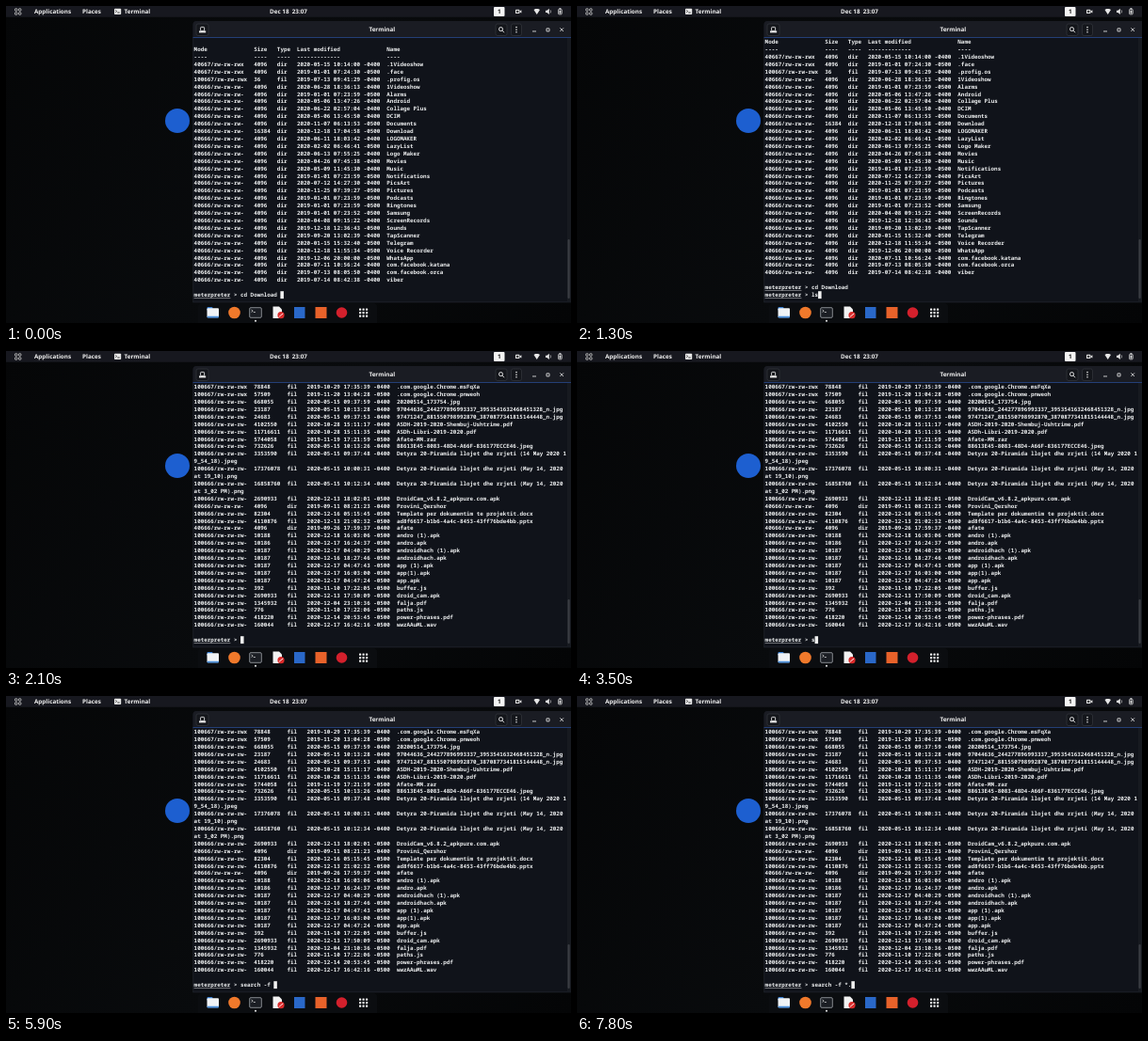
An HTML page with a canvas for the animation above (8 s loop, 600 px wide and 337 px high).

```html
<!DOCTYPE html>
<html lang="en">
<head>
<meta charset="utf-8">
<title>Terminal session</title>
<style>
html, body { margin: 0; width: 100%; height: 100%; overflow: hidden; background: #050608; }
canvas { display: block; width: 600px; height: 337px; }
</style>
</head>
<body>
<canvas id="stage" width="600" height="337"></canvas>
<script>
const ctx = document.getElementById('stage').getContext('2d');
const LOOP = 8000;
const ROWS = 35, COLS = 112, CELL = 3.53, LINE = 7.91, LEFT = 199.6, LAST_ROW = 307;
const PROMPT = 'meterpreter > ';
const MONO = '600 5.88px "Noto Sans Mono", "DejaVu Sans Mono", monospace';
const SANS = '700 6.3px "Open Sans", "Noto Sans", sans-serif';

const HOME = `4096 dir 2020-05-15 10:14:00 -0400 .1Videoshow
4096 dir 2019-01-01 07:24:30 -0500 .face
36 fil 2019-07-13 09:41:29 -0400 .profig.os
4096 dir 2020-06-28 18:36:13 -0400 1Videoshow
4096 dir 2019-01-01 07:23:59 -0500 Alarms
4096 dir 2020-05-06 13:47:26 -0400 Android
4096 dir 2020-06-22 02:57:04 -0400 Collage Plus
4096 dir 2020-05-06 13:45:50 -0400 DCIM
4096 dir 2020-11-07 06:13:53 -0500 Documents
16384 dir 2020-12-18 17:04:58 -0500 Download
4096 dir 2020-06-11 18:03:42 -0400 LOGOMAKER
4096 dir 2020-02-02 06:46:41 -0500 LazyList
4096 dir 2020-06-13 07:55:25 -0400 Logo Maker
4096 dir 2020-04-26 07:45:38 -0400 Movies
4096 dir 2020-05-09 11:45:30 -0400 Music
4096 dir 2019-01-01 07:23:59 -0500 Notifications
4096 dir 2020-07-12 14:27:30 -0400 PicsArt
4096 dir 2020-11-25 07:39:27 -0500 Pictures
4096 dir 2019-01-01 07:23:59 -0500 Podcasts
4096 dir 2019-01-01 07:23:59 -0500 Ringtones
4096 dir 2019-01-01 07:23:52 -0500 Samsung
4096 dir 2020-04-08 09:15:22 -0400 ScreenRecords
4096 dir 2019-12-18 12:36:43 -0500 Sounds
4096 dir 2019-09-20 13:02:39 -0400 TapScanner
4096 dir 2020-01-15 15:32:40 -0500 Telegram
4096 dir 2020-12-18 11:55:34 -0500 Voice Recorder
4096 dir 2019-12-06 20:00:00 -0500 WhatsApp
4096 dir 2020-07-11 10:56:24 -0400 com.facebook.katana
4096 dir 2019-07-13 08:05:50 -0400 com.facebook.orca
4096 dir 2019-07-14 08:42:38 -0400 viber`;

const DOWNLOAD = `78848 fil 2019-10-29 17:35:39 -0400 .com.google.Chrome.msFqXa
57509 fil 2019-11-20 13:04:28 -0500 .com.google.Chrome.pnweoh
668055 fil 2020-05-15 09:37:59 -0400 20200514_173754.jpg
23187 fil 2020-05-15 10:13:28 -0400 97044636_244277896993337_3953541632468451328_n.jpg
24683 fil 2020-05-15 09:37:53 -0400 97471247_881550798992870_3870877341815144448_n.jpg
4102550 fil 2020-10-28 15:11:17 -0400 ASDH-2019-2020-Shembuj-Ushtrime.pdf
11716611 fil 2020-10-28 15:11:35 -0400 ASDh-Libri-2019-2020.pdf
5744058 fil 2019-11-19 17:21:59 -0500 Afate-MM.rar
732626 fil 2020-05-15 10:13:26 -0400 B8613E45-8083-48D4-A66F-836177ECCE46.jpeg
3353590 fil 2020-05-15 09:37:48 -0400 Detyra 20-Piramida llojet dhe rrjeti (14 May 2020 19_54_18).jpeg
17376078 fil 2020-05-15 10:00:31 -0400 Detyra 20-Piramida llojet dhe rrjeti (May 14, 2020 at 19_10).png
16858760 fil 2020-05-15 10:12:34 -0400 Detyra 20-Piramida llojet dhe rrjeti (May 14, 2020 at 3_02 PM).png
2690933 fil 2020-12-13 18:02:01 -0500 DroidCam_v6.8.2_apkpure.com.apk
4096 dir 2019-09-11 08:21:23 -0400 Provini_Qershor
82304 fil 2020-12-16 05:15:45 -0500 Template per dokumentim te projektit.docx
4110876 fil 2020-12-13 21:02:32 -0500 ad8f6617-b1b6-4a4c-8453-43ff76bde4bb.pptx
4096 dir 2019-09-26 17:59:37 -0400 afate
10188 fil 2020-12-18 16:03:06 -0500 andro (1).apk
10186 fil 2020-12-17 16:24:37 -0500 andro.apk
10187 fil 2020-12-17 04:40:29 -0500 androidhach (1).apk
10187 fil 2020-12-16 18:27:46 -0500 androidhach.apk
10187 fil 2020-12-17 04:47:43 -0500 app (1).apk
10187 fil 2020-12-17 16:03:00 -0500 app(1).apk
10187 fil 2020-12-17 04:47:24 -0500 app.apk
392 fil 2020-11-10 17:22:05 -0500 buffer.js
2690933 fil 2020-12-13 17:50:09 -0500 droid_cam.apk
1345932 fil 2020-12-04 23:10:36 -0500 falja.pdf
776 fil 2020-11-10 17:22:06 -0500 paths.js
418220 fil 2020-12-14 20:53:45 -0500 power-phrases.pdf
160044 fil 2020-12-17 16:42:16 -0500 wwzAAuML.wav`;

const row = (sizeWidth, mode, size, type, date, name) =>
  mode.padEnd(18) + size.padEnd(sizeWidth + 2) + type.padEnd(6) + date.padEnd(27) + name;

// Formats a listing and wraps it at the terminal width.
function table(text, sizeWidth) {
  return text.split('\n').flatMap(entry => {
    const [, size, type, date, name] = entry.match(/^(\d+) (\w+) (.{25}) (.+)$/);
    const open = name.startsWith('.');
    const mode = (type === 'dir' ? '40' : '100') + (open ? '667/rw-rw-rwx' : '666/rw-rw-rw-');
    const line = row(sizeWidth, mode, size, type, date, name);
    return line.length > COLS ? [line.slice(0, COLS), line.slice(COLS)] : [line];
  });
}

const homeLines = [
  row(5, 'Mode', 'Size', 'Type', 'Last modified', 'Name'),
  row(5, '----', '----', '----', '-------------', '----'),
  ...table(HOME, 5), ''
];
const downloadLines = [...table(DOWNLOAD, 8), ''];

const typed = (text, times, t) => text.slice(0, times.filter(at => t >= at).length);
const LS_KEYS = [1100, 1300];
const SEARCH_KEYS = [3500, 3700, 4100, 4200, 4500, 4800, 5000, 5500, 5700, 5900, 7300, 7800];
const BLINKS = [[800, 1100], [2900, 3500], [6500, 7100]];

function linesAt(t) {
  if (t >= 2100) return [...downloadLines, PROMPT + typed('search -f *.', SEARCH_KEYS, t)];
  if (t < 300) return [...homeLines, PROMPT + 'cd Download '];
  const lines = [...homeLines, PROMPT + 'cd Download'];
  if (t < 400) return [...lines, ''];
  lines.push(PROMPT + typed('ls', LS_KEYS, t));
  return t < 1700 ? lines : [...lines, ''];
}

function rect(x, y, w, h, color, radius = 0) {
  ctx.fillStyle = color;
  ctx.beginPath();
  ctx.roundRect(x, y, w, h, radius);
  ctx.fill();
}
function frame(x, y, w, h, color, radius = 0, weight = 0.8) {
  ctx.strokeStyle = color;
  ctx.lineWidth = weight;
  ctx.beginPath();
  ctx.roundRect(x, y, w, h, radius);
  ctx.stroke();
}
function disc(x, y, r, color) {
  ctx.fillStyle = color;
  ctx.beginPath();
  ctx.arc(x, y, r, 0, Math.PI * 2);
  ctx.fill();
}
function path(points, color, weight) {
  ctx.beginPath();
  points.forEach(([x, y]) => ctx.lineTo(x, y));
  if (weight) {
    ctx.strokeStyle = color;
    ctx.lineWidth = weight;
    ctx.stroke();
  } else {
    ctx.fillStyle = color;
    ctx.fill();
  }
}
function label(text, x, y, align = 'left', color = '#f0f0f0') {
  ctx.font = SANS;
  ctx.textAlign = align;
  ctx.fillStyle = color;
  ctx.fillText(text, x, y);
}
function dots(x, y, step, size, color) {
  for (let i = 0; i < 9; i++) rect(x + i % 3 * step, y + Math.floor(i / 3) * step, size, size, color, 0.4);
}

function drawDesktop() {
  const shade = ctx.createLinearGradient(0, 0, 600, 337);
  shade.addColorStop(0, '#050607');
  shade.addColorStop(0.5, '#090b0d');
  shade.addColorStop(1, '#040506');
  ctx.fillStyle = shade;
  ctx.fillRect(0, 0, 600, 337);
  disc(182, 122, 13, '#1d5fd0');
}

function drawTopBar() {
  rect(0, 0, 600, 11.8, '#17181f');
  for (let i = 0; i < 4; i++) frame(9.5 + i % 2 * 4, 2.8 + (i >> 1) * 4, 2.4, 2.4, '#d8d8d8', 0.6, 0.8);
  label('Applications', 30, 8.3);
  label('Places', 81, 8.3);
  rect(115, 2.8, 7.2, 6.2, '#e8e8e8', 0.8);
  path([[116.2, 4.4], [117.6, 5.6], [116.2, 6.8]], '#111', 0.7);
  rect(118.3, 6.6, 2.4, 0.8, '#111');
  label('Terminal', 125.5, 8.3);
  label('Dec 18  23:07', 300, 8.3, 'center');
  rect(518, 1, 11.5, 10, '#f4f4f4', 1);
  label('1', 523.7, 8.3, 'center', '#111');
  rect(541, 3.8, 4.4, 4.2, '#e0e0e0', 0.6);
  rect(542.1, 4.9, 2.2, 2, '#17181f');
  path([[545.4, 5.4], [547.4, 4.2], [547.4, 7.6], [545.4, 6.4]], '#e0e0e0');
  path([[560.5, 4], [562.2, 3], [565.2, 3], [567, 4], [563.7, 9]], '#e8e8e8');
  path([[573, 4.8], [574.5, 4.8], [576.8, 2.8], [576.8, 9], [574.5, 7], [573, 7]], '#e8e8e8');
  path([[578, 4.2], [578.7, 5.9], [578, 7.6]], '#c8c8c8', 0.7);
  frame(586.6, 3.4, 3.6, 5.4, '#e8e8e8', 0.7);
  rect(587.6, 4.6, 1.6, 3.2, '#e8e8e8');
  rect(587.5, 2.2, 1.8, 1, '#e8e8e8');
}

function button(x, w) {
  rect(x, 19, w, 12.5, '#14161b', 2);
  frame(x, 19, w, 12.5, '#34373e', 2, 0.7);
}

function drawWindow(t) {
  rect(198.5, 16, 402, 299, '#10131a', [4, 0, 0, 0]);
  rect(198.5, 16, 402, 17.5, '#1a1c23', [4, 0, 0, 0]);
  rect(198.5, 33.2, 401.5, 0.9, '#2a4c94');
  rect(198.5, 34, 0.7, 281, '#23272e');
  rect(198.5, 314.5, 402, 0.7, '#23272e');

  button(202, 13);
  frame(206.6, 22.4, 4, 4.2, '#e8e8e8', 0.8, 0.9);
  rect(205, 26.4, 7.2, 2, '#e8e8e8');
  label('Terminal', 399.3, 27.3, 'center');
  button(520, 12);
  ctx.strokeStyle = '#e8e8e8';
  ctx.lineWidth = 1;
  ctx.beginPath();
  ctx.arc(525.5, 24.6, 2, 0, Math.PI * 2);
  ctx.moveTo(527, 26.2);
  ctx.lineTo(529, 28.2);
  ctx.stroke();
  button(536.5, 11);
  for (let i = 0; i < 3; i++) disc(542, 22.6 + i * 2.6, 0.8, '#e8e8e8');
  rect(559, 26.5, 4, 0.9, '#dcdcdc');
  frame(574, 23.9, 3, 3, '#dcdcdc', 0, 0.9);
  path([[588.4, 23.4], [592, 27]], '#dcdcdc', 0.9);
  path([[592, 23.4], [588.4, 27]], '#dcdcdc', 0.9);

  rect(596, 34, 4, 280.5, '#171a20');
  const top = t < 2000 ? 248 : 264;
  rect(596.5, top, 2.2, 311 - top, '#3a3d43', 1.1);
}

function drawTerminal(t) {
  const lines = linesAt(t).slice(-ROWS);
  ctx.font = MONO;
  ctx.textAlign = 'left';
  lines.forEach((line, i) => {
    const baseline = LAST_ROW - (lines.length - 1 - i) * LINE + 2.1;
    ctx.fillStyle = '#eceeef';
    for (const word of line.matchAll(/\S+/g)) {
      ctx.fillText(word[0], LEFT + word.index * CELL, baseline);
    }
    if (line.startsWith(PROMPT)) rect(LEFT, baseline + 0.8, 11 * CELL, 0.6, '#d0d2d4');
  });
  if (!BLINKS.some(([from, to]) => t >= from && t < to)) {
    rect(LEFT + lines.at(-1).length * CELL, 303.2, CELL, 7.9, '#f2f2f2');
  }
}

function drawDock() {
  rect(204, 316, 190, 21, '#0b0d10', [4, 4, 0, 0]);
  rect(213.5, 320, 6, 4, '#3b82d6', 1);
  rect(213.5, 321.3, 12.5, 10, '#f1f3f5', 1);
  rect(213.5, 329.8, 12.5, 1.6, '#4a90dd', [0, 0, 1, 1]);
  disc(242.5, 326, 6.3, '#f0792b');
  rect(258.5, 320.5, 13, 11, '#1b1e24', 1.2);
  frame(258.7, 320.7, 12.6, 10.6, '#b4b8bd', 1.2, 0.7);
  path([[260.6, 323], [262.2, 324.2], [260.6, 325.4]], '#f0f0f0', 0.7);
  rect(262.8, 325, 2, 0.7, '#f0f0f0');
  disc(265, 334.8, 1, '#f0f0f0');
  path([[283.5, 319.5], [290, 319.5], [293, 322.5], [293, 332], [283.5, 332]], '#f2f2f2');
  disc(292, 328.7, 3.6, '#d92b2b');
  path([[289.8, 330.5], [294.2, 326.9]], '#fff', 0.9);
  rect(306, 320, 11.5, 12, '#2a68c8');
  rect(328.5, 320, 12, 12, '#e8622a');
  disc(356.5, 326, 5.8, '#d3202c');
  dots(375, 321.5, 3.5, 2.2, '#f0f0f0');
}

function render(now) {
  const t = now % LOOP;
  ctx.textRendering = 'geometricPrecision';
  ctx.textBaseline = 'alphabetic';
  drawDesktop();
  drawTopBar();
  drawWindow(t);
  drawTerminal(t);
  drawDock();
}

const start = performance.now();
function tick() {
  render(performance.now() - start);
  requestAnimationFrame(tick);
}
tick();
</script>
</body>
</html>
```
